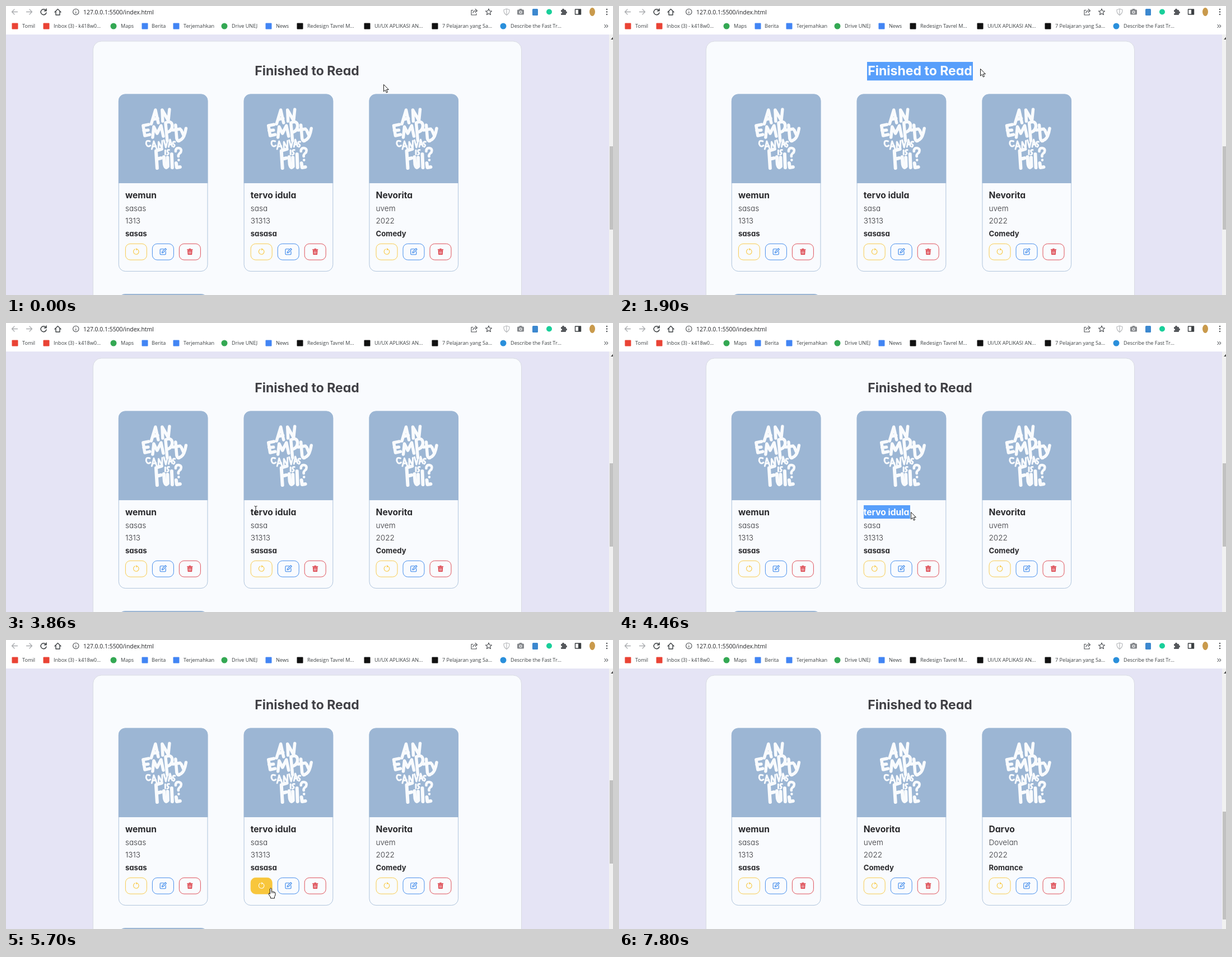
Recreate the animation shown at these times as an HTML page. Size 1084 by 517 pixels, loop 8000 ms.

```html
<!DOCTYPE html>
<html lang="en">
<head>
<meta charset="utf-8">
<title>Finished to Read</title>
<style>
  html, body { margin: 0; width: 100%; height: 100%; overflow: hidden; background: #fff; }
  svg { display: block; width: 100vw; height: 100vh; }
  text { white-space: pre; font-family: Inter, Roboto, sans-serif; font-feature-settings: "cv11"; }
  .bar { font: 9.1px "Open Sans", "Noto Sans", sans-serif; fill: #3c4043; }
  .url { font: 10.4px "Open Sans", "Noto Sans", sans-serif; fill: #202124; }
  .head { font-size: 23px; font-weight: 700; text-anchor: middle; fill: #404045; }
  .name { font-size: 15.6px; font-weight: 700; fill: #2a2a2d; }
  .info { font-size: 13.6px; font-weight: 300; fill: #333337; }
  .kind { font-size: 13.2px; font-weight: 700; fill: #2a2a2d; }
  .sel text { fill: #fff; }
  .line { fill: none; stroke: currentColor; stroke-linecap: round; stroke-linejoin: round; }
  .btn rect { fill: none; stroke: currentColor; stroke-width: .9; }
  .btn.hover rect { fill: currentColor; }
  .btn.hover .icon { color: #fff; }
</style>
</head>
<body>
<svg viewBox="0 0 1084 517" preserveAspectRatio="none">
  <defs>
    <clipPath id="headClip"><rect x="443" y="100" width="0" height="33.5"/></clipPath>
    <clipPath id="nameClip"><rect x="437" y="326" width="0" height="24"/></clipPath>

    <g id="lettering" class="line" color="#f9fbfd">
      <g stroke-width="5.500">
        <path d="M259.500 211L267 186L272 209M262 203L271 201M280 206L279 186L290 205L292 185"/>
        <path d="M255 212L245 214L248 232L257 230M246 223L254 222"/>
        <path d="M262 235L264 216L270 228L277 214L281 233"/>
        <path d="M288 241L285 209Q296 204 297 214Q297 224 287 226"/>
        <path d="M303 213L305 237Q307 244 311 240M298 222L311 220"/>
        <path d="M313 222L317 231M321.500 219Q319 235 313 239"/>
      </g>
      <g stroke-width="3">
        <path d="M257 242Q249.500 239 250.500 247Q253 253.500 258 249.500"/>
        <path d="M260.500 256L264 242L269 255M262 251.500L268 250.500"/>
        <path d="M272.500 256V243L279 255V241"/>
        <path d="M282 240L285.500 253L289 239"/>
        <path d="M290.500 252L293 239L297 251M291.500 248L296 247.500"/>
        <path d="M302 243Q297 242 298.500 246.500Q303.500 249 299.500 252"/>
        <path d="M284.500 258V265.500M291.500 257.500Q287 257 288.500 261Q292.500 264 288 266"/>
      </g>
      <g stroke-width="6">
        <path d="M270 290L268 259L278 256M269 274L277 272"/>
        <path d="M282 270L283 283Q285 292 289 287L288.500 271M296 265L297 289M304 281L305 289L311 288"/>
      </g>
      <path stroke-width="4.600" d="M303 260Q303 254 308 254Q315 255 312 262Q307 266 308 269M308.500 275.500v.1"/>
    </g>

    <g id="redo" class="line" stroke-width="1.1">
      <path d="M2.500 -4.100A4.800 4.800 0 1 1 -2 -4.400"/>
      <path d="M0 -6.500L2.700 -4.300L0 -2.100Z" fill="currentColor" stroke="none"/>
    </g>
    <g id="edit" class="line" stroke-width="1.1">
      <path d="M1.500 -4.800H-4Q-5.200 -4.800 -5.200 -3.600V4Q-5.200 5.200 -4 5.200H3.600Q4.800 5.200 4.800 4V-.5"/>
      <path d="M-2 2.300L-1.400 -.2L4.300 -5.800L6 -4.100L.4 1.600Z"/>
    </g>
    <g id="trash">
      <path fill="currentColor" d="M-5 -4.500H-2L-1.400 -5.600H1.400L2 -4.500H5V-3H-5ZM-4.300 -2.400H4.300L3.700 5.500H-3.700Z"/>
      <path d="M-1.900 -1L-1.700 4M0 -1V4M1.900 -1L1.700 4" stroke="#f9fbfe" stroke-width=".8"/>
    </g>

    <g id="arrow">
      <path d="M.5 .5V13L3.400 10.300L5.400 15L7.500 14.100L5.500 9.600H9.400Z" fill="#fff" stroke="#111" stroke-width=".95"/>
    </g>
    <g id="beam">
      <path d="M-2.500 -7.500Q0 -7.500 0 -6V6Q0 7.500 -2.500 7.500M2.500 -7.500Q0 -7.500 0 -6M0 6Q0 7.500 2.500 7.500" fill="none" stroke="#222"/>
    </g>
    <g id="hand">
      <path d="M-1.500 1Q0 -1.500 1.300 1V6Q2.500 4.700 3.600 6.300Q5 5.500 5.800 7.200Q7.500 6.500 8 8.500V12L6.500 15.500V18H-.5V16L-4 10.800Q-4.500 8.800 -2.700 9L-1.500 10.500Z" fill="#fff" stroke="#111"/>
      <path d="M1.300 6V9M3.600 6.500V9M5.800 7.300V9.300" stroke="#111" stroke-width=".8"/>
    </g>
  </defs>

  <g id="page"></g>
  <g id="chrome"></g>
  <use id="cursor" href="#arrow"/>
</svg>

<script>
const $ = id => document.getElementById(id);
const text = (x, y, cls, str) => `<text x="${x}" y="${y}" class="${cls}">${str}</text>`;
const rect = (x, y, w, h, rx, fill) =>
  `<rect x="${x}" y="${y}" width="${w}" height="${h}" rx="${rx}" fill="${fill}"/>`;
const dot = (x, y, r, fill) => `<circle cx="${x}" cy="${y}" r="${r}" fill="${fill}"/>`;
const line = (d, color = '#4a4d51', width = 1.3) =>
  `<path class="line" color="${color}" stroke-width="${width}" d="${d}"/>`;

// Library cards
const wemun = ['wemun', 'sasas', '1313', 'sasas'];
const tervo = ['tervo idula', 'sasa', '31313', 'sasasa'];
const nevorita = ['Nevorita', 'uvem', '2022', 'Comedy'];
const darvo = ['Darvo', 'Dovelan', '2022', 'Romance'];
const rows = [['name', 343.5], ['info', 367], ['info', 389], ['kind', 411.5]];
const buttons = [['redo', '#f8c63c'], ['edit', '#3584ea'], ['trash', '#dc4049']];
const CARD_X = 200.9, CARD_STEP = 223.8;

function card(book, col) {
  const labels = rows.map(([cls, y], i) => text(12, y, cls, book[i])).join('');
  const tools = buttons.map(([icon, color], i) => {
    const x = 12.5 + i * 48;
    return `<g class="btn ${icon}" color="${color}">
      <rect x="${x}" y="425.400" width="38" height="28.800" rx="8.500"/>
      <use class="icon" href="#${icon}" x="${x + 19}" y="439.500"/></g>`;
  }).join('');
  return `<g transform="translate(${CARD_X + col * CARD_STEP} 0)">
    <rect x=".4" y="158" width="158.700" height="316.600" rx="12" fill="#f9fbfe" stroke="#9cb6d4" stroke-width=".8"/>
    <path d="M0 317V170a12 12 0 0 1 12 -12.500h135.500a12 12 0 0 1 12 12.500V317Z" fill="#9cb6d4"/>
    <use href="#lettering" x="-201"/>${labels}${tools}</g>`;
}

const shelf = (id, books) => `<g id="${id}">${books.map(card).join('')}</g>`;
const picked = (id, x, y, w, h, label) =>
  `<g class="sel" clip-path="url(#${id})">${rect(x, y, w, h, 0, '#589ffb')}${label}</g>`;
const heading = text(537.5, 124, 'head', 'Finished to Read');

$('page').innerHTML =
  rect(0, 51, 1084, 466, 0, '#e5e4f5') +
  `<rect x="155.500" y="63" width="765" height="480" rx="15" fill="#f9fbfe" stroke="#d9dce3"/>` +
  heading + picked('headClip', 443, 100, 190, 33.5, heading) +
  shelf('before', [wemun, tervo, nevorita]) +
  shelf('after', [wemun, nevorita, darvo]) +
  `<g id="nextRow">${rect(CARD_X, 515, 159.5, 40, 12, '#9cb6d4')}</g>` +
  picked('nameClip', 437, 326, 90, 24, text(CARD_X + CARD_STEP + 12, 343.5, 'name', tervo[0])) +
  rect(1077, 51, 7, 466, 0, '#f1f1f1') +
  `<path d="M1080 60l4 -4.500v4.500Z" fill="#505050"/>` +
  `<rect id="thumb" x="1078" width="6" fill="#c1c1c1"/>`;

// Browser bars
const marks = [
  [16, '#ea4335', 1, 29, 'Tomil'],
  [72, '#ea4335', 1, 85, 'Inbox (3) - k418w0...'],
  [192, '#34a853', 0, 205, 'Maps'],
  [248, '#4285f4', 1, 260, 'Berita'],
  [304, '#4285f4', 1, 317, 'Terjemahkan'],
  [390, '#34a853', 0, 403, 'Drive UNEJ'],
  [469, '#4285f4', 1, 482, 'News'],
  [525, '#111', 1, 538, 'Redesign Tavrel M...'],
  [645, '#111', 1, 658, 'UI/UX APLIKASI AN...'],
  [766, '#111', 1, 779, '7 Pelajaran yang Sa...'],
  [888, '#2a8fdb', 0, 901, 'Describe the Fast Tr...'],
];
$('chrome').innerHTML =
  rect(0, 0, 1084, 51, 0, '#fff') +
  line('M20.500 10.500H10.500M15 6L10.500 10.500L15 15', '#a9abae') +
  line('M36.500 10.500H46.500M42 6L46.500 10.500L42 15', '#a9abae') +
  line('M71 7.500A5 5 0 1 0 72 12M72 5V8.700H68.300', '#3c4043', 1.5) +
  line('M87 11L92.500 5.500L98 11M89 9.500V16H96V9.500', '#3c4043', 1.4) +
  line('M130 10.500a5.200 5.200 0 1 1 -10.400 0a5.200 5.200 0 1 1 10.400 0M124.800 10.200V13.200M124.800 7.800v.1', '#4a4d51', 1.1) +
  text(138, 14.5, 'url', '127.0.0.1:5500/index.html') +
  line('M834 7.500H831V16H840V13.500M834 12.500Q834.500 8.500 839 8.500M838 5.500L841.500 8.500L838 11.500', '#4a4d51', 1.1) +
  line('M862 5L863.600 8.800L867.500 9.100L864.500 11.700L865.500 15.600L862 13.500L858.500 15.600L859.500 11.700L856.500 9.100L860.400 8.800Z', '#4a4d51', 1.1) +
  line('M894 5L899 6.800Q899.500 13 894 16.500Q888.500 13 889 6.800ZM894 6V15', '#b8babd', 1.2) +
  rect(913, 6.5, 12, 9, 1.5, '#85888c') + rect(916.5, 5, 5, 3, 1, '#85888c') +
  dot(919, 11, 2.6, '#fff') + dot(919, 11, 1.5, '#85888c') +
  rect(940, 5, 10, 12, 1.5, '#3c88cf') +
  dot(970, 10.5, 5, '#19cf9a') +
  rect(991, 7, 9, 9, 1, '#55585c') + dot(995, 6.8, 2, '#55585c') + dot(1000, 11.5, 2, '#55585c') + dot(991.5, 11.7, 1.5, '#fff') +
  line('M1016.500 6H1026.500V15H1016.500Z', '#3c4043', 1.4) + rect(1022, 6, 4.5, 9, 0, '#3c4043') +
  `<ellipse cx="1047" cy="10.500" rx="5" ry="7.500" fill="#c99a4c"/>` +
  [6, 10.5, 15].map(y => dot(1073, y, 1.2, '#4a4d51')).join('') +
  marks.map(([x, color, square, tx, label]) =>
    (square ? rect(x - 5.5, 30.5, 11, 11, 1, color) : dot(x, 36, 5.5, color)) +
    text(tx, 39, 'bar', label)).join('') +
  line('M1069 33.500L1071.300 36L1069 38.500M1072.500 33.500L1074.800 36L1072.500 38.500', '#4a4d51', 1.1);

// Pointer steps: time, x, y, shape, right edge of the selection
const A = 'arrow', I = 'beam', H = 'hand';
const steps = [
  [0, 674, 140, A], [150, 663, 137, A], [290, 622, 129, I], [430, 562, 121, I],
  [570, 500, 118, I], [710, 460, 117, I], [850, 446, 116, I], [980, 447, 116, I],
  [1120, 487, 115, I, 456], [1240, 528, 114, I, 487], [1370, 562, 114, I, 530],
  [1500, 592, 113, I, 570], [1630, 618, 113, I, 602], [1770, 636, 112, A, 632],
  [1900, 645, 112, A, 632], [2460, 652, 117, A, 632], [2580, 658, 121, A, 632],
  [2890, 658, 121, A],
  [3170, 648, 134, A], [3300, 616, 172, A], [3440, 566, 228, A], [3570, 510, 283, A],
  [3700, 467, 320, A], [3840, 446, 335, I], [3970, 440, 338, I], [4100, 447, 338, I, 442],
  [4220, 482, 338, I, 470], [4340, 510, 338, I, 505], [4460, 521, 338, A, 520],
  [4590, 526, 341, A, 520], [4730, 531, 346, A, 520], [4870, 534, 350, A, 520], [5130, 534, 350, A],
  [5280, 549, 364, A], [5420, 541, 393, A], [5560, 507, 418, A],
  [5700, 473, 444, H], [5840, 469, 444, H], [5970, 468, 444, H],
  [6960, 474, 449, H], [7100, 524, 459, A], [7240, 626, 451, A], [7380, 751, 436, A],
  [7520, 904, 420, A], [7660, 1066, 408, A], [7800, 1100, 408, A],
];
const LOOP = 8000, REMOVED = 6430;
const show = (id, on) => $(id).setAttribute('visibility', on ? 'visible' : 'hidden');
const headSel = document.querySelector('#headClip rect');
const nameSel = document.querySelector('#nameClip rect');
const hoverable = ['before', 'after'].map(id => $(id).children[1].querySelector('.redo'));

function draw(now) {
  const t = now % LOOP;
  const [, x, y, shape, edge = 0] = steps.findLast(s => s[0] <= t);
  const cursor = $('cursor');
  cursor.setAttribute('href', '#' + shape);
  cursor.setAttribute('x', x);
  cursor.setAttribute('y', y);
  headSel.setAttribute('width', edge && t < 2890 ? edge - 443 : 0);
  nameSel.setAttribute('width', edge && t > 2890 ? edge - 437 : 0);
  hoverable.forEach(b => b.classList.toggle('hover', shape === H));

  const removed = t >= REMOVED;
  show('before', !removed);
  show('after', removed);
  show('nextRow', !removed);
  $('thumb').setAttribute('y', removed ? 307 : 251);
  $('thumb').setAttribute('height', removed ? 193 : 149);
}

const start = performance.now();
(function tick() {
  draw(Math.max(0, performance.now() - start));
  requestAnimationFrame(tick);
})();
</script>
</body>
</html>
```
